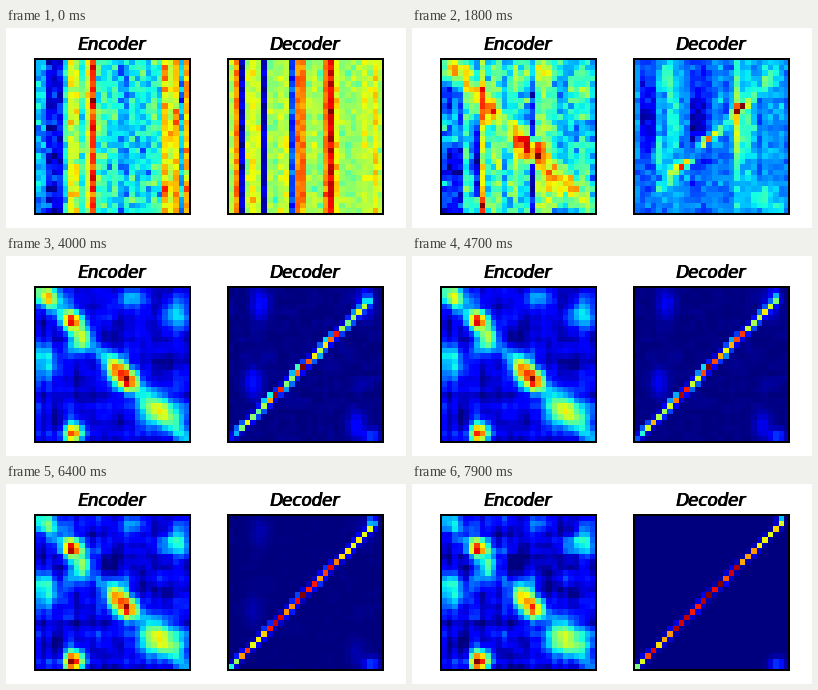
A matplotlib script for the animation above (8000 ms loop, 400 by 200 pixels).

```python
import numpy as np
import matplotlib.pyplot as plt
from matplotlib.animation import FuncAnimation

W, H, DPI = 400, 200, 100
N = 28
FRAMES, STEP = 80, 100
MIXED, FORMED = 10, 27  # second stripe pattern, first blob pattern

rng = np.random.default_rng(7)
row, col = np.mgrid[0:N, 0:N].astype(float)

# row, col, row spread, col spread, first height, last height
BLOBS = [
    (1, 2, 1.5, 1.5, .8, .2),
    (5.5, 6.3, 1.2, 1.2, .5, .8),
    (9, 7.6, 1.6, 1.2, .5, .35),
    (14, 14.2, 1.6, 1.3, .5, .5),
    (16.3, 16.2, 1.3, 1.3, .7, .6),
    (22, 22.5, 2.3, 2.8, .35, .45),
    (26, 6.4, 1.5, 1.1, .55, .9),
    (13, 1.3, 2.6, 1.5, .35, .4),
    (4.5, 25, 2.2, 1.6, .25, .3),
    (1.5, 16.8, 1.3, 1.6, .35, .2),
]


def rescale(m):
    return (m - m.min()) / (m.max() - m.min())


def mix(a, b, t):
    return a + (b - a) * t


def bump(r, c, sr, sc):
    return np.exp(-((row - r) / sr) ** 2 / 2 - ((col - c) / sc) ** 2 / 2)


def smooth_noise():
    m = rng.normal(size=(N + 2, N + 2))
    return sum(m[i:i + N, j:j + N] for i in range(3) for j in range(3)) / 3


def texture():
    bands = rng.normal(0, .03, (N, 1)) + rng.normal(0, .03, (1, N))
    return .12 + .04 * smooth_noise() + bands


def stripes(base, groups, noise, gain=1):
    levels = base + rng.normal(0, .04, N)
    for level, cols in groups:
        levels[list(cols)] = level
    m = base + (levels - base) * gain + rng.normal(0, noise, (N, N))
    return rescale(np.clip(m, 0, 1))


lower = .75 + .35 / (1 + np.exp(13 - row))
middle = .25 + .75 * np.exp(-((row - 10.5) / 7) ** 2)

enc_stripes = [
    stripes(.42, [(.12, (2, 3, 4)), (.31, (0, 1, 15, 16)), (.6, (6, 7, 9, 24)),
                  (.72, (23, 25, 27)), (.87, (10,))], .065),
    stripes(.47, [(.2, (0, 1, 2, 3)), (.14, (6, 16)), (.82, (7,)),
                  (.62, (9, 10, 13, 17, 18, 19))], .08, lower),
]
dec_stripes = [
    stripes(.52, [(.06, (2, 6)), (.18, (11,)), (.72, (1, 12, 13, 17)),
                  (.85, (18,))], .035),
    stripes(.41, [(.22, (1, 2, 3, 10, 11, 12)), (.53, (6, 7)),
                  (.6, (19, 20)), (.82, (18,))], .035, middle),
]
enc_texture = texture(), texture()
line_noise = rng.uniform(-.3, .2, (2, N, 1))
haze = np.abs(smooth_noise())


def encoder_blobs(s):
    m = mix(*enc_texture, s)
    m = m + mix(.35, .12, s) * np.exp(-((row - col) / 1.7) ** 2 / 2)
    for r, c, sr, sc, a, b in BLOBS:
        m += mix(a, b, s) * bump(r, c, sr, sc)
    return rescale(np.clip(m, 0, 1.1))


def decoder_line(s):
    centre = np.minimum(N - 1 - row, mix(23, 25.8, s))
    centre = centre + mix(.35, .1, s) * np.sin(1.2 * row)
    beat = .6 + .35 * np.cos((row - 13.8) * 2 * np.pi / 5.3)
    level = mix(beat, .8, s) * (1 + mix(*line_noise, s))
    reach = np.exp(-((row - 14) / mix(9.5, 15, s)) ** 6)
    m = level * reach * np.exp(-((col - centre) / mix(.75, .42, s)) ** 2 / 2)
    m += .02 * (1 - s) * haze + .2 * bump(26.5, 25.3, .8, 1)
    for r, c in [(2.5, 5.3), (2.5, 24), (24.5, 22.5), (16.8, 4)]:
        m += .25 * (1 - s) * bump(r, c, 1.8, 1.1)
    return rescale(m)


def pattern(first, formed, f):
    if f < MIXED:
        return rescale(mix(*first, f / MIXED))
    if f < FORMED:
        return rescale(mix(first[1], formed(0), (f - MIXED) / (FORMED - MIXED)))
    return formed(((f - FORMED) / (FRAMES - 1 - FORMED)) ** .5)


fig = plt.figure(figsize=(W / DPI, H / DPI), dpi=DPI, facecolor="white")


def panel(x, name):
    ax = fig.add_axes([x / W, 14 / H, 155 / W, 155 / H])
    ax.set_xticks([])
    ax.set_yticks([])
    for s in ax.spines.values():
        s.set_linewidth(1.44)
    # layered copies give the heavy lettering
    for dx in (-1, -.5, 0):
        ax.annotate(name, (.5, 1), xytext=(dx, 6.5), xycoords="axes fraction",
                    textcoords="offset points", ha="center", va="baseline",
                    family="DejaVu Sans", style="italic", size=12)
    return ax.imshow(np.zeros((N, N)), cmap="jet", vmin=0, vmax=1,
                     aspect="auto", interpolation="nearest")


panels = [(panel(29, "Encoder"), enc_stripes, encoder_blobs),
          (panel(222, "Decoder"), dec_stripes, decoder_line)]


def update(f):
    for image, first, formed in panels:
        image.set_data(pattern(first, formed, f))
    return [p[0] for p in panels]


anim = FuncAnimation(fig, update, frames=FRAMES, interval=STEP,
                     repeat=True, repeat_delay=0, blit=False)
plt.show()
```
